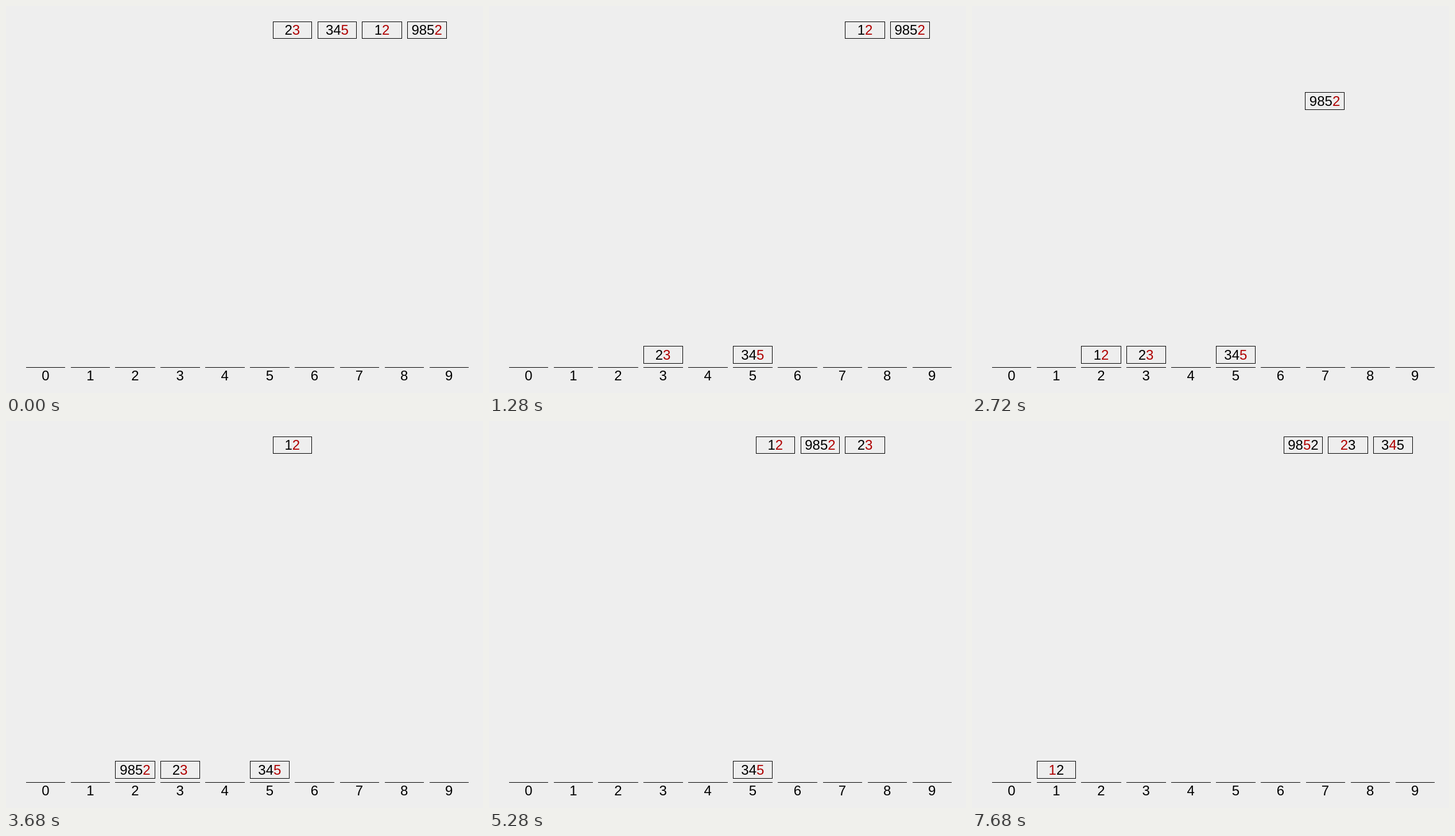
An HTML page with a canvas that plays this animation: 831x674 px, repeating every 8000 ms.

```html
<!DOCTYPE html>
<html lang="en">
<head>
<meta charset="utf-8">
<title>Radix sort</title>
<style>
  html, body { margin: 0; width: 100%; height: 100%; overflow: hidden; background: #eee; }
  canvas { display: block; }
</style>
</head>
<body>
<canvas id="stage" width="831" height="674"></canvas>
<script>
(() => {
  const ctx = document.getElementById('stage').getContext('2d');
  const LOOP = 8000, TICK = 40, MOVE = 333, NEXT_DIGIT = 6600;
  const PITCH = 78.1, SHIFT = 430;
  const LEFT = [35, 113, 190, 269, 347, 425, 503, 582, 660, 738];

  const slot = k => ({ l: LEFT[k], r: Math.round(103.3 + PITCH * k), c: 68.8 + PITCH * k });

  // Resting places: in the list at the top, or in a bucket at a stack level.
  function inList(j) {
    const s = slot(j);
    return { l: s.l + SHIFT, r: s.r + SHIFT, c: s.c + SHIFT, t: 27, b: 57 };
  }
  function inBucket(k, level = 0) {
    return { ...slot(k), t: 592 - 36 * level, b: 623 - 36 * level };
  }

  // Each card lists its moves as [start time, destination].
  const cards = [
    { text: '23', home: inList(0), moves: [[138, inBucket(3)], [4938, inList(2)]] },
    { text: '345', home: inList(1), moves: [[938, inBucket(5)], [5755, inList(3)]] },
    { text: '12', home: inList(2), moves: [[1738, inBucket(2)], [3298, inList(0)], [7315, inBucket(1)]] },
    { text: '9852', home: inList(3), moves: [[2515, inBucket(2, 1)], [3298, inBucket(2)], [4115, inList(1)]] }
  ];

  const easeIn = p => p * p * p;

  function place(card, time) {
    let at = card.home;
    for (const [start, to] of card.moves) {
      if (time <= start) break;
      const p = easeIn(Math.min(1, (time - start) / MOVE));
      const from = at;
      at = {};
      for (const key in from) at[key] = from[key] + (to[key] - from[key]) * p;
    }
    return at;
  }

  function write(str, x, y, color) {
    ctx.fillStyle = color;
    ctx.fillText(str, x, y);
  }

  function drawCard(text, at, hot) {
    const l = Math.round(at.l), r = Math.round(at.r);
    const t = Math.round(at.t), b = Math.round(at.b);
    ctx.strokeRect(l + 0.5, t + 0.5, r - l - 1, b - t - 1);

    const i = text.length - 1 - hot;
    const parts = [text.slice(0, i), text[i], text.slice(i + 1)];
    let x = at.c - ctx.measureText(text).width / 2;
    parts.forEach((part, n) => {
      write(part, x, b - 7, n === 1 ? '#b00000' : '#000');
      x += ctx.measureText(part).width;
    });
  }

  function draw(time) {
    ctx.fillStyle = '#eee';
    ctx.fillRect(0, 0, 831, 674);
    ctx.font = '24px "Liberation Sans", Arial, sans-serif';
    ctx.strokeStyle = '#000';
    ctx.lineWidth = 1;

    for (let k = 0; k < 10; k++) {
      const s = slot(k), label = String(k);
      ctx.fillStyle = '#000';
      ctx.fillRect(s.l, 629, s.r - s.l, 1);
      write(label, s.c - ctx.measureText(label).width / 2, 652, '#000');
    }
    const hot = time >= NEXT_DIGIT ? 1 : 0;
    for (const card of cards) drawCard(card.text, place(card, time), hot);
  }

  const begin = performance.now();
  function frame() {
    const time = (performance.now() - begin) % LOOP;
    draw(Math.floor(time / TICK) * TICK);
    requestAnimationFrame(frame);
  }
  frame();
})();
</script>
</body>
</html>
```
